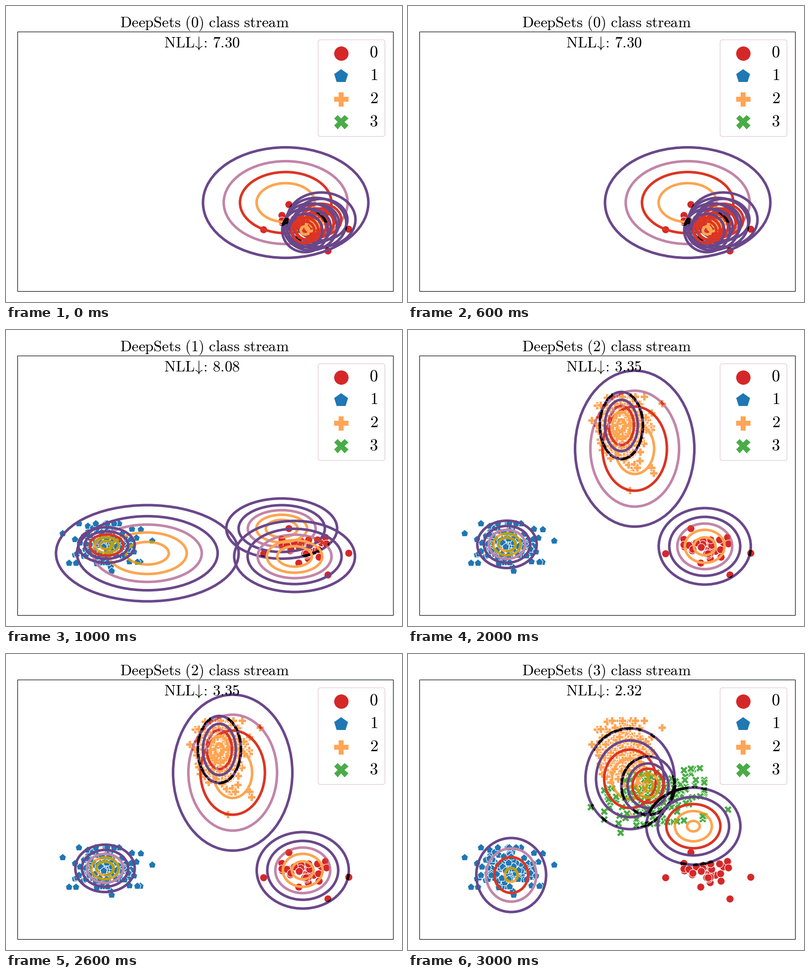
A matplotlib script that plays this animation: 800 by 600 pixels, repeating every 4000 ms.

```python
import matplotlib.pyplot as plt
import numpy as np
from matplotlib.animation import FuncAnimation
from matplotlib.markers import MarkerStyle
from matplotlib.patches import Ellipse, FancyBboxPatch, Rectangle
from matplotlib.path import Path

plt.rcParams["mathtext.fontset"] = "cm"
DPI = 100
PT = 72 / DPI  # points per pixel
MARKER_PX = 15.4

COLORS = ["#d62728", "#1f77b4", "#ffa556", "#4aac47"]
MARKERS = "opPX"
SCORES = [7.30, 8.08, 3.35, 2.32]

# Ring colours: D and P share a hue, but D darkens where it crosses points.
RING = {"D": "#6a478a", "P": "#6a478a", "K": "#c285a9", "R": "#dc3523", "O": "#fda550"}
# Ring colour on top of points: code -> (colour, classes it applies to)
CROSSING = {
    "D": ("black", (0, 2, 3)),
    "K": ("#dc3523", (0, 2)),
    "O": ("#b9a012", (1, 3)),
}

# Gaussian components per step: centre, outer radii, level falloff, ring codes
CLUMP = [
    (*shape, 0.6, "DPRRO")
    for shape in np.linspace((637, 433, 69, 55), (604, 455, 46, 44), 4)
]
MIXTURES = [
    [(565, 398.5, 167, 112, 0.632, "PKRO"), *CLUMP],
    [
        (285.5, 452.5, 184.5, 97.5, 0.587, "PPKOO"),
        (203, 436, 57, 36, 0.587, "PPROO"),
        (557, 402.5, 112, 61, 0.57, "DPKOO"),
        (583, 459, 122, 72, 0.57, "DPKOO"),
    ],
    [
        (458, 240.5, 120.5, 158, 0.645, "PKRO"),
        (431, 193.5, 43.5, 68, 0.6, "DPKOO"),
        (200, 434.5, 60, 48, 0.57, "PPKOO"),
        (599.5, 438.5, 93, 77.5, 0.587, "DPKOO"),
    ],
    [
        (208.5, 448, 70.5, 75, 0.697, "PKRO"),
        (448.5, 253, 90, 102, 0.604, "DPROO"),
        (485, 267, 54, 59, 0.6, "DPROO"),
        (576.5, 349, 95, 78, 0.61, "DPROO"),
    ],
]

rng = np.random.default_rng(7)


def cloud(count, center, spread, extremes, slope=0.0):
    """A truncated Gaussian cloud with its outermost points fixed."""
    core = np.clip(rng.normal(size=(count, 2)), -1.9, 1.9) * spread
    core[:, 1] += slope * core[:, 0]
    return np.vstack([core + center, extremes])


POINTS = [
    cloud(34, (608, 443), (27, 15), [(520, 453), (571, 402), (692, 452), (650, 496)]),
    cloud(125, (205, 436), (35, 23), [(114, 412), (127, 472), (295, 427), (213, 488)]),
    cloud(185, (437, 207), (29, 38), [(371, 183), (513, 149), (448, 325), (496, 290)]),
    cloud(205, (497, 292), (53, 27), [(369, 310), (646, 315), (571, 232), (429, 362)],
          slope=-0.1),
]


def marker_outline(cls):
    """One compound path that covers every point of a class."""
    style = MarkerStyle(MARKERS[cls])
    shape = style.get_path().transformed(style.get_transform())
    flipped = shape.vertices * (MARKER_PX - 2.5) * [1, -1]
    return Path.make_compound_path(
        *[Path(flipped + p, shape.codes) for p in POINTS[cls]]
    )


OUTLINES = [marker_outline(cls) for cls in range(4)]

fig = plt.figure(figsize=(8, 6), dpi=DPI, facecolor="white")
ax = fig.add_axes([0, 0, 1, 1])


def roman(x, y, text, size):
    ax.text(x, y, rf"$\mathrm{{{text}}}$", fontsize=size, ha="center",
            va="baseline", zorder=7)


def ring(center, width, height, color):
    return ax.add_patch(Ellipse(center, width, height, fill=False, edgecolor=color,
                                linewidth=5.2 * PT, zorder=3))


def draw_component(x, y, a, b, falloff, codes, step):
    # Evenly spaced density levels give squared radii 1 - falloff * ln(k).
    for k, code in enumerate(codes, start=1):
        scale = 2 * np.sqrt(1 - falloff * np.log(k))
        size = (a * scale, b * scale)
        ring((x, y), *size, RING[code])
        color, classes = CROSSING.get(code, (None, ()))
        for cls in classes:
            if cls <= step:
                ring((x, y), *size, color).set_clip_path(OUTLINES[cls], ax.transData)


def draw_legend():
    ax.add_patch(FancyBboxPatch((635, 73), 126, 187, facecolor="white",
                                edgecolor="#e6c8d8", linewidth=0.9, zorder=5,
                                boxstyle="round,pad=4.5,rounding_size=5"))
    for cls in range(4):
        ax.plot(677, 96 + 46.4 * cls, MARKERS[cls], color=COLORS[cls],
                markersize=29 * PT, markeredgewidth=0, zorder=6)
        roman(743, 104 + 46.4 * cls, str(cls), 24)


def update(step):
    ax.clear()
    ax.set(xlim=(0, 800), ylim=(600, 0))
    ax.axis("off")
    ax.add_patch(Rectangle((23, 52), 759, 526, fill=False, edgecolor="black",
                           linewidth=0.8, zorder=6))
    for cls in range(step + 1):
        ax.plot(*POINTS[cls].T, MARKERS[cls], color=COLORS[cls], zorder=2,
                markersize=MARKER_PX * PT, markeredgecolor="white",
                markeredgewidth=0.8)
    for component in MIXTURES[step]:
        draw_component(*component, step)
    draw_legend()
    roman(401.5, 42.8, rf"DeepSets\ ({step})\ class\ stream", 22.1)
    roman(396, 84.3, rf"NLL\!\downarrow\!\!:\!\ {SCORES[step]:.2f}", 22.2)
    return ax.get_children()


anim = FuncAnimation(fig, update, frames=4, interval=1000, init_func=lambda: [],
                     repeat=True, repeat_delay=0, blit=False)
plt.show()
```
